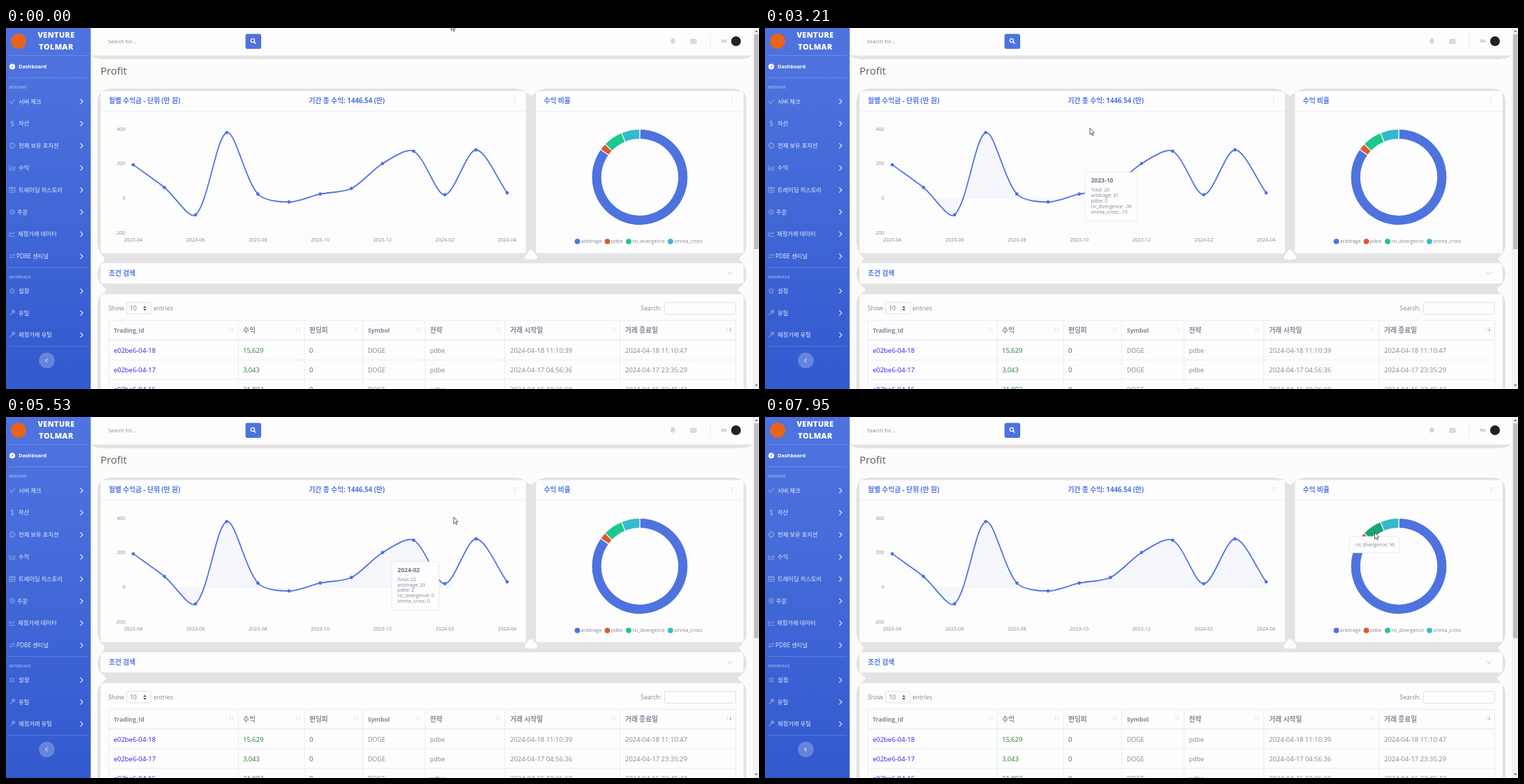
These frames come from a looping animation (1080x519 px, 8000 ms). An HTML page:

```html
<!DOCTYPE html>
<html lang="ko">
<head>
<meta charset="utf-8">
<title>Profit dashboard</title>
<style>
  html, body { margin: 0; width: 100%; height: 100%; overflow: hidden; background: #fcfcfd; }
  svg { display: block; width: 100%; height: 100%; font-family: "Open Sans", "Noto Sans CJK KR", sans-serif; }
</style>
</head>
<body>
<svg id="stage" viewBox="0 0 1080 519"></svg>
<script>
const BLUE = '#4e73df', GREY = '#858796', PALE = '#d1d3e2', LINE = '#e3e6f0';
const stage = document.getElementById('stage');

// ---------- drawing helpers ----------
const text = (x, y, s, size, fill = GREY, extra = '') =>
  `<text x="${x}" y="${y}" font-size="${size}" fill="${fill}" ${extra}>${s}</text>`;
const rect = (x, y, w, h, fill, extra = '') =>
  `<rect x="${x}" y="${y}" width="${w}" height="${h}" fill="${fill}" ${extra}/>`;
const circle = (x, y, r, fill, extra = '') => `<circle cx="${x}" cy="${y}" r="${r}" fill="${fill}" ${extra}/>`;
const stroke = (d, color, width = 1, extra = '') =>
  `<path d="${d}" fill="none" stroke="${color}" stroke-width="${width}" ${extra}/>`;
const BOLD = 'font-weight="700"', MIDDLE = 'text-anchor="middle"', END = 'text-anchor="end"';

// ---------- sidebar ----------
function sidebar() {
  const icons = {
    check: 'M-4 0l3 3l5-6',
    dollar: 'M2-2.5q-4-2-4 .5q0 1.6 2 2q2 .5 2 2q0 2.5-4 .8M0-4.5v9',
    target: 'M-3.5 0a3.5 3.5 0 1 0 7 0a3.5 3.5 0 1 0-7 0M-4.5 0h3M1.5 0h3M0-4.5v3M0 1.5v3',
    bars: 'M-4-3.5v7h8.5M-2 2v-2M0 2v-4M2 2v-3M4 2v-4.5',
    table: 'M-4-3.5h8v7h-8zM-4-2.5h8M-4 .5h8M0-3v6',
    coin: 'M-3.2 0a3.2 3.2 0 1 0 6.4 0a3.2 3.2 0 1 0-6.4 0M-1.5 0h3M0-2v4',
    line: 'M-4-3.5v7h8.5M-2.5 1l2-2.5l2 1.5l2.5-3',
    swap: 'M-4-1.5h7.5l-2-2M4 1.5h-7.5l2 2',
    gear: 'M-2.5 0a2.5 2.5 0 1 0 5 0a2.5 2.5 0 1 0-5 0M0-4v1.5M0 2.5v1.5M-3.5-2l1.3.7M2.2 1.3l1.3.7M-3.5 2l1.3-.7M2.2-1.3l1.3-.7',
    wrench: 'M-3.5 3.5l4-4M3.5-3l-1.8 1.5l-1-1l1.5-1.5q-3-.3-2.5 2.8q1 2 4 .2z'
  };
  const items = [
    [105.5, 'check', '서버 체크', 18], [137.3, 'dollar', '자산', 18], [169, 'target', '현재 보유 포지션', 18],
    [201, 'bars', '수익', 18], [232.7, 'table', '트레이딩 히스토리', 18], [264.5, 'coin', '주문', 16],
    [296, 'line', '재정거래 데이터', 17], [328, 'swap', 'PDBE 센티널', 15], [378, 'gear', '설정', 18],
    [409.5, 'wrench', '유틸', 18], [441, 'wrench', '재정거래 유틸', 18]
  ];
  const heading = (y, s) => text(4, y, s, 5.9, 'rgba(255,255,255,.45)', BOLD);
  return rect(0, 0, 121.5, 519, 'url(#side)') + circle(18, 19, 11, '#e8641b') +
    ['VENTURE', 'TOLMAR'].map((s, i) =>
      text(72, 14 + 17 * i, s, 11, '#fff', `${MIDDLE} font-weight="800" letter-spacing=".3"`)).join('') +
    stroke('M4 39.5H117M4 71.5H117M4 344.5H117M4 457.5H117', 'rgba(255,255,255,.25)', .7) +
    circle(9, 55.5, 4.1, '#fff') + stroke('M8.5 57l2-3.5', BLUE, 1) +
    text(18, 58.3, 'Dashboard', 7.4, '#fff', BOLD) + heading(87, 'ADDONS') + heading(359.7, 'INTERFACE') +
    items.map(([y, icon, label, x]) =>
      `<g transform="translate(9 ${y})">${stroke(icons[icon], 'rgba(255,255,255,.35)', 1.1)}</g>` +
      text(x, y + 3, label, 8.3, 'rgba(255,255,255,.87)') +
      stroke(`M106.5 ${y - 3.3}l3.6 3.6l-3.6 3.6`, 'rgba(255,255,255,.85)', 1.2)).join('') +
    circle(58.5, 478, 11.3, 'rgba(255,255,255,.25)') +
    stroke('M59.5 475.3l-2.7 2.7l2.7 2.7', 'rgba(255,255,255,.65)', 1.2);
}

// ---------- page furniture ----------
const panel = (x, y, w, h) =>
  rect(x, y, w, h, '#fdfdfe', `rx="3" stroke="${LINE}" stroke-width=".6"`);
const title = (x, y, s) => text(x, y, s, 9.7, BLUE, BOLD);
const dots = x => [-3, 0, 3].map(d => circle(x, 104.5 + d, .85, PALE)).join('');

function panels() {
  return '<g filter="url(#shadow)">' + rect(121.5, -40, 949.5, 79.5, '#fdfdfe') +
    panel(135.5, 90.5, 610.5, 233.5) + panel(760, 90.5, 298, 233.5) +
    panel(135.5, 338, 922.5, 29.5) + panel(135.5, 382.5, 922.5, 180) + '</g>' +
    stroke('M135.5 120H746M760 120H1058', LINE, .7) +
    title(147.5, 108, '월별 수익금 - 단위 (만 원)') + title(434.5, 108, '기간 총 수익: 1446.54 (만)') +
    title(771.5, 108, '수익 비율') + title(147.5, 356, '조건 검색') + dots(729.5) + dots(1041.5) +
    stroke('M1035.3 351l3.2 3.2l3.2-3.2', '#b7b9cc', .9);
}

function topbar() {
  return text(146.5, 21.5, 'Search for...', 7.3) + rect(343.5, 8.5, 22.5, 21.5, BLUE, 'rx="2.5"') +
    circle(353.8, 18, 2.6, 'none', 'stroke="#fff" stroke-width="1.3"') + stroke('M355.7 20l2.5 2.5', '#fff', 1.5) +
    `<path d="M952.5 21.5q1.2-1 1.2-3.5q0-3 2.8-3.3q2.8.3 2.8 3.3q0 2.5 1.2 3.5zM955.3 22.3h2.4q-1.2 2.4-2.4 0z" fill="${PALE}"/>` +
    rect(981.3, 15.7, 9.4, 7, PALE, 'rx="1"') + stroke('M981.3 17.3l4.7 3l4.7-3', '#fdfdfe', .7) +
    stroke('M1010 8.5V30', LINE, .7) + text(1026, 21.3, 'ko', 6.8) + circle(1047, 19, 7, '#222');
}

function scrollbar() {
  return rect(1071, 0, 9, 519, '#f3f3f4') + rect(1073, 9, 6.5, 309, '#bdbdbd') +
    '<path d="M1074 6l2.3-3l2.3 3z M1074 512.5l2.3 3l2.3-3z" fill="#777"/>';
}

function table() {
  const columns = [147.5, 333, 428, 511.5, 601, 715.5, 880.5, 1046.5];
  const textX = [154.5, 340, 435, 519, 608, 723, 888];
  const heads = ['Trading_Id', '수익', '펀딩피', 'Symbol', '전략', '거래 시작일', '거래 종료일'];
  const rows = [
    ['e02be6-04-18', '15,629', '2024-04-18 11:10:39', '2024-04-18 11:10:47'],
    ['e02be6-04-17', '3,043', '2024-04-17 04:56:36', '2024-04-17 23:35:29'],
    ['e02be6-04-16', '21,892', '2024-04-16 19:26:19', '2024-04-16 22:45:42']
  ];
  const colors = ['#2c22e6', '#2a7d32', '#2a7d32', GREY, GREY, GREY, GREY];
  const headSize = s => /[a-z]/.test(s) ? 8.6 : 9.7;
  const arrow = (x, dir, color) => stroke(`M${x} 430.5v5M${x - 1.2} ${433 + 1.3 * dir}l1.2 ${1.2 * dir}l1.2 ${-1.2 * dir}`, color, .6);
  return text(147, 405.5, 'Show', 8.9) + text(211.5, 405.5, 'entries', 8.7) + text(940, 406, 'Search:', 8.7, GREY, END) +
    rect(173, 394.5, 35, 16.5, '#fdfdfe', `rx="2" stroke="${PALE}" stroke-width=".7"`) + text(178, 406, '10', 8.2, '#6e707e') +
    '<path d="M196.8 402.3l2.3-2.5l2.3 2.5z M196.8 404l2.3 2.5l2.3-2.5z" fill="#444"/>' +
    rect(944.5, 394.5, 102, 17, '#fdfdfe', `rx="2" stroke="${PALE}" stroke-width=".7"`) +
    stroke('M147.5 420.3H1046.5M147.5 477.2H1046.5M147.5 505.2H1046.5' + columns.map(x => `M${x} 420V519`).join(''), LINE, .7) +
    stroke('M147.5 448.7H1046.5', LINE, 1.3) +
    heads.map((s, i) => text(textX[i], 437.5, s, headSize(s), GREY, BOLD) +
      arrow(columns[i + 1] - 11.5, -1, PALE) + arrow(columns[i + 1] - 7.5, 1, i === 6 ? '#777' : PALE)).join('') +
    rows.map(([id, profit, from, to], r) => [id, profit, '0', 'DOGE', 'pdbe', from, to].map((s, i) =>
      text(textX[i], 466.5 + 28 * r, s, /\d/.test(s) ? 9.45 : 9, colors[i])).join('')).join('');
}

// ---------- line chart ----------
// month, [total, arbitrage, pdbe, rsi_divergence, smma_cross], tooltip width
const names = ['Total', 'arbitrage', 'pdbe', 'rsi_divergence', 'smma_cross'];
const months = [
  ['2023-04', [195]], ['2023-05', [64]],
  ['2023-06', [-94, 99, 0, -136, -56], 79], ['2023-07', [381, 120, 0, 204, 57], 76],
  ['2023-08', [26, 98, 0, -52, -20], 75], ['2023-09', [-20, 64, 0, -51, -33], 75],
  ['2023-10', [26, 81, 0, -36, -19], 75], ['2023-11', [58, 72, 0, 0, -14], 70],
  ['2023-12', [202, 95, 0, 0, 107], 70], ['2024-01', [273, 81, 0, 192, 0], 76],
  ['2024-02', [22, 20, 2, 0, 0], 68], ['2024-03', [281, 90, 3, 188, 0], 76],
  ['2024-04', [33, 9, 24, 0, 0], 68]
];
const ZERO = 245.2;
const px = i => 182.5 + 44.69 * i;
const py = v => ZERO - .249 * v;
const points = months.map(([, v], i) => ({ x: px(i), y: py(v[0]) }));

function curve() {
  const last = points.length - 1;
  const handles = points.map((p, i) => {
    const a = points[Math.max(i - 1, 0)], b = points[Math.min(i + 1, last)];
    const before = Math.hypot(p.x - a.x, p.y - a.y), after = Math.hypot(b.x - p.x, b.y - p.y);
    const control = k => {
      const f = .3 * k / (before + after);
      return [f * (b.x - a.x), f * (b.y - a.y)];
    };
    const [ax, ay] = control(before), [bx, by] = control(after);
    const cap = y => Math.min(295, Math.max(145.8, y));
    return { into: `${p.x - ax} ${cap(p.y - ay)}`, out: `${p.x + bx} ${cap(p.y + by)}` };
  });
  return `M${points[0].x} ${points[0].y}` + points.slice(1).map((p, i) =>
    `C${handles[i].out} ${handles[i + 1].into} ${p.x} ${p.y}`).join('');
}

function lineChart() {
  const path = curve();
  return [400, 200, 0, -200].map(v =>
      text(171, py(v) + 2, v, 7, GREY, END) +
      stroke(`M176 ${py(v)}H726`, '#eaecf4', .6, 'stroke-dasharray="1.2 1.2"')).join('') +
    months.map(([m], i) => i % 2 ? '' : text(px(i), 307, m, 7.1, GREY, MIDDLE)).join('') +
    `<path d="${path}V${ZERO}H${px(0)}z" fill="${BLUE}" fill-opacity=".045" clip-path="url(#reveal)"/>` +
    stroke(path, BLUE, 1.8) + points.map(p => circle(p.x, p.y, 2.4, BLUE)).join('');
}

// ---------- doughnut ----------
const slices = [
  ['arbitrage', 1227, BLUE, BLUE, 819.5], ['pdbe', 33, '#e0582f', '#e0582f', 862.5],
  ['rsi_divergence', 96, '#1cc88a', '#17a673', 893], ['smma_cross', 90, '#36b9cc', '#2c9faf', 953]
];
const ring = { x: 909, y: 214.5, outer: 69, inner: 54.7 };
const onRing = (r, a) => [ring.x + r * Math.sin(a), ring.y - r * Math.cos(a)];
const sum = slices.reduce((s, d) => s + d[1], 0);
let turned = 0;
const angles = slices.map(d => {
  const from = turned;
  return [from, turned += d[1] / sum * 2 * Math.PI];
});

function doughnut() {
  return slices.map(([, , color], i) => {
    const [a, b] = angles[i], big = +(b - a > Math.PI), { outer, inner } = ring;
    return `<path id="slice${i}" fill="${color}" stroke="#fff" stroke-width="1.1" d="M${onRing(outer, a)}A${outer} ${outer} 0 ${big} 1 ${onRing(outer, b)}L${onRing(inner, b)}A${inner} ${inner} 0 ${big} 0 ${onRing(inner, a)}z"/>`;
  }).join('') + slices.map(([name, , color, , x]) => circle(x, 306.8, 3.9, color) + text(x + 5.2, 309.3, name, 7)).join('');
}

// ---------- tooltips ----------
const GAP = 8.4;
const lineTip = i => {
  const [month, values, w] = months[i];
  const y = py(values.reduce((a, b) => a + b) / values.length), x = px(i);
  const box = { w, h: 70, head: month, lines: values.map((v, k) => `${names[k]}: ${v}`) };
  if (i === 2) return { ...box, x: x - w / 2, y: y - 70 - GAP, side: 'bottom' };
  return i <= 6 ? { ...box, x: x + GAP, y: y - 35, side: 'left' } : { ...box, x: x - GAP - w, y: y - 35, side: 'right' };
};
const ringTip = i => {
  const [x, y] = onRing((ring.outer + ring.inner) / 2, (angles[i][0] + angles[i][1]) / 2);
  const w = i === 2 ? 72 : 66;
  return { w, h: 23.5, x: x - w / 2, y: y + GAP, side: 'top', lines: [`${slices[i][0]}: ${slices[i][1]}`] };
};
const tips = [
  { make: lineTip, end: 6400, steps: [[1060, 2], [1945, 3], [2770, 4], [2840, 5], [2900, 6], [3350, 7], [4007, 8], [4640, 9], [5030, 10], [5650, 11], [6052, 12]] },
  { make: ringTip, end: Infinity, steps: [[6880, 3], [7560, 2]] }
];
const ease = dt => 1 - (1 - Math.min(1, Math.max(0, dt / 400))) ** 4;

function tooltip({ make, end, steps }, t) {
  const passed = steps.filter(s => s[0] <= t);
  if (!passed.length) return '';
  const opacity = ease(t - steps[0][0]) * (1 - ease(t - end));
  if (opacity <= 0) return '';
  let pos;
  passed.forEach(([at, i], k) => {
    const goal = make(i), from = pos || goal;
    const f = ease((k + 1 < passed.length ? passed[k + 1][0] : t) - at);
    pos = { ...goal, x: from.x + (goal.x - from.x) * f, y: from.y + (goal.y - from.y) * f };
  });
  const { x, y, w, h, side, head, lines } = pos;
  const caret = {
    left: `M${x + .4} ${y + h / 2 - 2.8}l-2.8 2.8l2.8 2.8`,
    right: `M${x + w - .4} ${y + h / 2 - 2.8}l2.8 2.8l-2.8 2.8`,
    top: `M${x + w / 2 - 2.8} ${y + .4}l2.8-2.8l2.8 2.8`,
    bottom: `M${x + w / 2 - 2.8} ${y + h - .4}l2.8 2.8l2.8-2.8`
  }[side];
  const edge = 'stroke="#dddfeb" stroke-width=".6"';
  return `<g opacity="${opacity}">` + rect(x, y, w, h, '#fdfdfe', `rx="3" ${edge}`) +
    `<path d="${caret}" fill="#fdfdfe" ${edge}/>` +
    (head ? text(x + 8.6, y + 14.8, head, 8.5, '#6e707e', BOLD) : '') +
    lines.map((s, k) => text(x + 8.6, y + (head ? 27.6 : 14.2) + 7.9 * k, s, 6.75)).join('') + '</g>';
}

// ---------- pointer ----------
const route = [
  [400, 638.5, -6], [590, 560, 8], [690, 430, 34], [790, 300, 55], [890, 232, 72], [1000, 243, 95], [1060, 251, 133],
  [1110, 262, 160], [1210, 271, 179], [1601, 278.5, 185], [1945, 294, 181], [2500, 320, 155], [2770, 339, 143],
  [2840, 383, 142], [2900, 428, 143], [2970, 459, 144], [3217, 466, 144], [3350, 473, 146], [3830, 503, 148],
  [4007, 517.6, 148], [4025, 522.5, 148], [4640, 562, 146], [4934, 590.5, 144], [5030, 607, 144], [5540, 642, 144],
  [5650, 651.7, 144], [6052, 696, 143], [6146, 714.5, 143], [6345, 721, 145], [6400, 735, 146], [6880, 893, 151],
  [7150, 898, 156], [7460, 898, 156], [7560, 889, 159], [7900, 874.5, 166], [8000, 874.5, 166]
];
function pointer(t) {
  const k = Math.max(1, route.findIndex(r => r[0] >= t));
  const [t0, x0, y0] = route[k - 1], [t1, x1, y1] = route[k];
  const f = Math.max(0, (t - t0) / (t1 - t0));
  return [x0 + (x1 - x0) * f, y0 + (y1 - y0) * f];
}

// ---------- scene ----------
// The wide soft shadow is posterised into one flat grey halo.
stage.innerHTML = `<defs>
  <linearGradient id="side" x2="0" y2="1"><stop offset=".08" stop-color="${BLUE}"/><stop offset="1" stop-color="#3259ce"/></linearGradient>
  <filter id="shadow" filterUnits="userSpaceOnUse" x="100" y="-60" width="1000" height="660" color-interpolation-filters="sRGB">
    <feGaussianBlur in="SourceAlpha" stdDeviation="7.9"/><feOffset dy="1.3"/>
    <feComponentTransfer><feFuncA type="discrete" tableValues="0 0 0 .1 .1 .1 .1 .1 .1 .1"/></feComponentTransfer>
    <feGaussianBlur stdDeviation=".7"/><feMerge><feMergeNode/><feMergeNode in="SourceGraphic"/></feMerge></filter>
  <clipPath id="reveal"><rect id="revealed" x="240" y="140" width="0" height="160"/></clipPath></defs>` +
  rect(0, 0, 1080, 519, '#fcfcfd') + panels() + topbar() + text(135.5, 67, 'Profit', 14.9, '#5a5c69') +
  table() + lineChart() + doughnut() + sidebar() + scrollbar() + '<g id="tips"></g>' +
  '<path id="pointer" d="M0 0V9.3L2.1 7.4L3.6 10.7L5 10L3.5 6.9L6.3 6.6z" fill="#fff" stroke="#333" stroke-width=".8"/>';

const layer = document.getElementById('tips'), arrow = document.getElementById('pointer');
const revealed = document.getElementById('revealed');
const shapes = slices.map((_, i) => document.getElementById('slice' + i));

function draw() {
  // The screen was sampled about ten times a second, so time advances in steps.
  const now = performance.now() % 8000;
  const t = now < 490 ? 0 : 490 + 101 * Math.floor((now - 490) / 101 + .15);
  const [x, y] = pointer(t);
  arrow.setAttribute('transform', `translate(${x} ${y})`);
  layer.innerHTML = tips.map(tip => tooltip(tip, t)).join('');
  revealed.setAttribute('width', t < 1060 ? 0 : Math.min(480, x - 240));
  const hovered = t < 6880 ? -1 : t < 7560 ? 3 : 2;
  shapes.forEach((s, i) => s.setAttribute('fill', slices[i][i === hovered ? 3 : 2]));
  requestAnimationFrame(draw);
}
draw();
</script>
</body>
</html>
```
